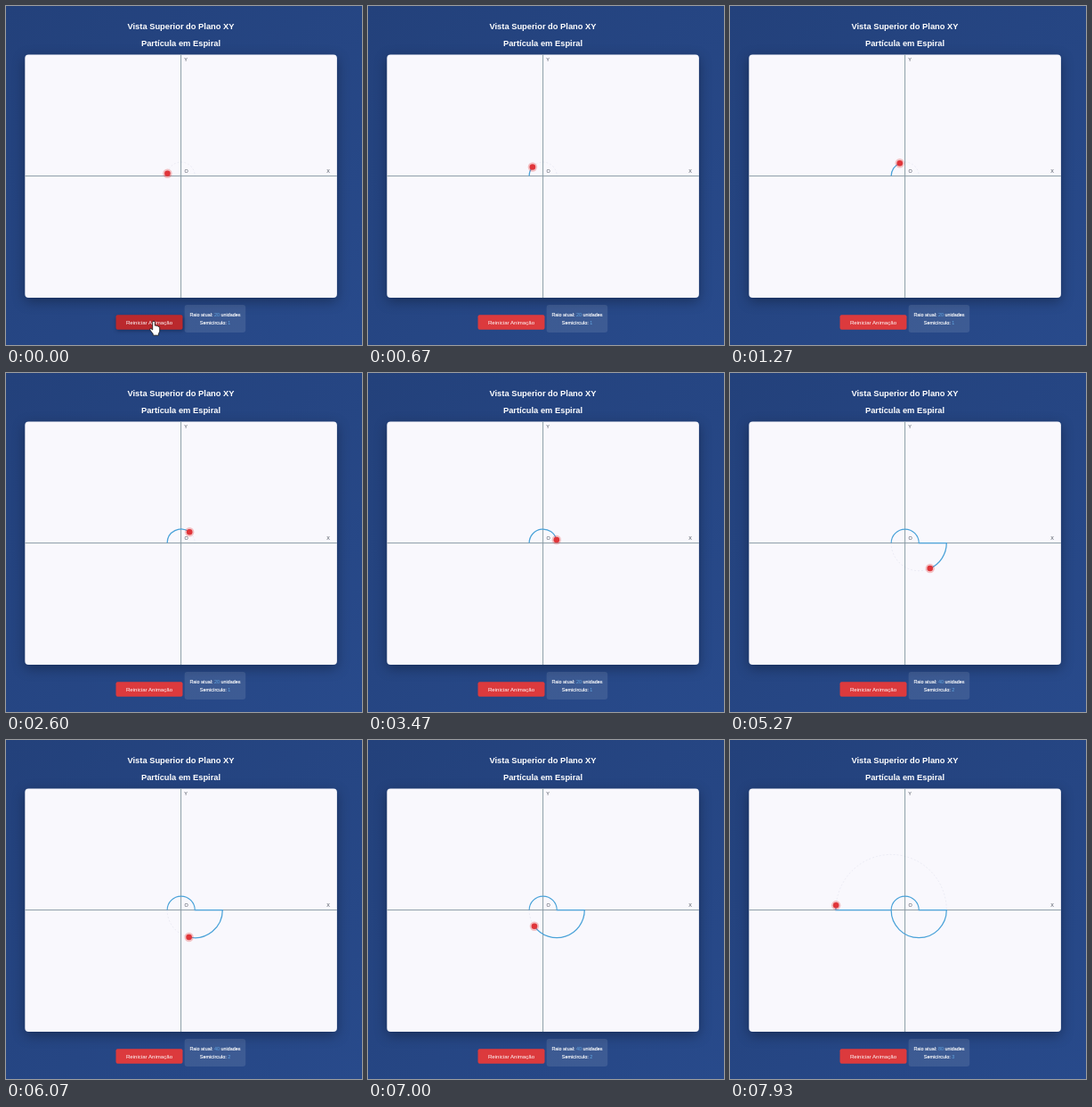
Write an HTML page that moves like this. It is 400x380 px and loops after 8000 ms.

```html
<!DOCTYPE html>
<html lang="pt">
<head>
<meta charset="utf-8">
<title>Partícula em Espiral</title>
<style>
  html, body { margin: 0; width: 100%; height: 100%; overflow: hidden; background: #26457f; }
  svg { display: block; width: 100vw; height: 100vh; font-family: "Liberation Sans", Arial, sans-serif; }
  .title { font-size: 9.33px; font-weight: 700; fill: #fff; text-anchor: middle; }
  .info { font-size: 5.45px; fill: #fff; stroke: #fff; stroke-width: .14px; text-anchor: middle; }
  .info tspan { fill: #63a9e6; stroke: none; }
  .label { font-size: 5.45px; fill: #454b57; }
  .axis { stroke: #8b9ca5; stroke-width: 1; }
  .card { filter: drop-shadow(0 4px 7px rgba(0, 0, 0, .32)); }
</style>
</head>
<body>
<svg viewBox="0 0 400 380">
  <defs>
    <linearGradient id="sky" x1="0" y1="0" x2="1" y2="1">
      <stop offset="0" stop-color="#23417b"/>
      <stop offset="1" stop-color="#284a8b"/>
    </linearGradient>
  </defs>
  <rect width="400" height="380" fill="url(#sky)"/>
  <text class="title" x="196.5" y="26">Vista Superior do Plano XY</text>
  <text class="title" x="196.5" y="44.8">Partícula em Espiral</text>

  <rect class="card" x="21.3" y="54.5" width="350.6" height="272.5" rx="4" fill="#f9f8fd"/>
  <path class="axis" d="M21.3 190.6H371.9M196.6 54.5V327"/>
  <text class="label" x="200.3" y="62.3">Y</text>
  <text class="label" x="360.2" y="187">X</text>
  <text class="label" x="200.4" y="187">O</text>

  <path id="guide" fill="none" stroke="#7882aa" stroke-opacity=".13" stroke-width=".8" stroke-dasharray="2 2"/>
  <path id="trail" fill="none" stroke="#4ba3d9" stroke-width="1.25"/>
  <g id="particle">
    <circle r="5.2" fill="#e53e3e" fill-opacity=".3"/>
    <circle r="3.3" fill="#e0353a"/>
  </g>

  <rect id="glow" x="124" y="348" width="76" height="16" rx="2" fill="#0a1838" style="filter:blur(2px)"/>
  <rect id="button" x="123.5" y="346.3" width="75" height="16.4" rx="2"/>
  <text x="161" y="356.8" font-size="6.1" fill="#fff" text-anchor="middle">Reiniciar Animação</text>

  <rect x="200.6" y="335" width="68.6" height="31" rx="3" fill="#fff" fill-opacity=".1"/>
  <text class="info" x="235" y="348.2">Raio atual: <tspan id="radius"></tspan> unidades</text>
  <text class="info" x="235" y="357.2">Semicírculo: <tspan id="count"></tspan></text>

  <g id="cursor" fill="#fff" stroke="#111" stroke-width=".8" stroke-linejoin="round">
    <path id="hand" d="M-1.3 8V1.2Q-1.3 0 0 0T1.3 1.2V5Q3 4.4 3.4 5.6Q4.8 5 5.2 6.3Q6.6 6 6.7 7.6V11Q6.4 13 5.4 14V16H-.8V14.4L-4.2 9.8Q-4.6 8 -3.2 8.2L-1.3 9.8Z"/>
    <path id="arrow" d="M0 0V11.5L2.7 9L4.4 13L6.2 12.2L4.5 8.4H8Z"/>
  </g>
</svg>
<script>
  const LOOP = 8000, FPS = 15, START = -235, TURN = 4030, SPEED = 45 / 1000;
  const AXIS_Y = 190.6;
  // dir: +1 sweeps left to right above the axis, -1 right to left below it
  const arcs = [
    { cx: 196.7, r: 15.55, dir: 1, units: 20 },
    { cx: 212.2, r: 31.1, dir: -1, units: 40 },
    { cx: 181.1, r: 62.2, dir: 1, units: 80 }
  ];
  const $ = id => document.getElementById(id);
  const clamp = (v, lo, hi) => Math.min(hi, Math.max(lo, v));
  const mix = (a, b, k) => a + (b - a) * k;

  function pointOn({ cx, r, dir }, deg) {
    const a = deg * Math.PI / 180;
    return [cx - dir * r * Math.cos(a), AXIS_Y - dir * r * Math.sin(a)];
  }
  const arcTo = (arc, deg) => `A${arc.r} ${arc.r} 0 0 1 ${pointOn(arc, deg)}`;

  function drawSpiral(t) {
    const index = clamp(Math.floor((t - START) / TURN), 0, arcs.length - 1);
    const arc = arcs[index];
    const deg = clamp((t - START - index * TURN) * SPEED, 0, 180);
    const [x, y] = pointOn(arc, deg);
    const trail = arcs.slice(0, index + 1).map((a, i) =>
      `${i ? "L" : "M"}${pointOn(a, 0)}${arcTo(a, i < index ? 180 : deg)}`);
    $("trail").setAttribute("d", trail.join(""));
    $("guide").setAttribute("d", `M${pointOn(arc, 0)}${arcTo(arc, 180)}`);
    $("particle").setAttribute("transform", `translate(${x} ${y})`);
    $("radius").textContent = arc.units;
    $("count").textContent = index + 1;
  }

  function drawPointer(t) {
    const k = clamp((t - 70) / 600, 0, 1);
    const ease = k * k * (3 - 2 * k);
    const x = mix(166, 410, ease), y = mix(353.2, 335, ease);
    const onButton = x < 198.5;
    $("cursor").setAttribute("transform", `translate(${x} ${y})`);
    $("cursor").style.display = k < 1 ? "" : "none";
    $("hand").style.display = onButton ? "" : "none";
    $("arrow").style.display = onButton ? "none" : "";
    const hover = 1 - clamp((t - 220) / 300, 0, 1);
    const rgb = [mix(220, 186, hover), mix(58, 41, hover), mix(61, 45, hover)].map(Math.round);
    $("button").setAttribute("fill", `rgb(${rgb})`);
    $("glow").setAttribute("opacity", hover * .5);
  }

  function frame() {
    const now = performance.now() % LOOP;
    const t = Math.floor(now * FPS / 1000 + .06) * 1000 / FPS;
    drawSpiral(t);
    drawPointer(t);
    requestAnimationFrame(frame);
  }
  frame();
</script>
</body>
</html>
```
